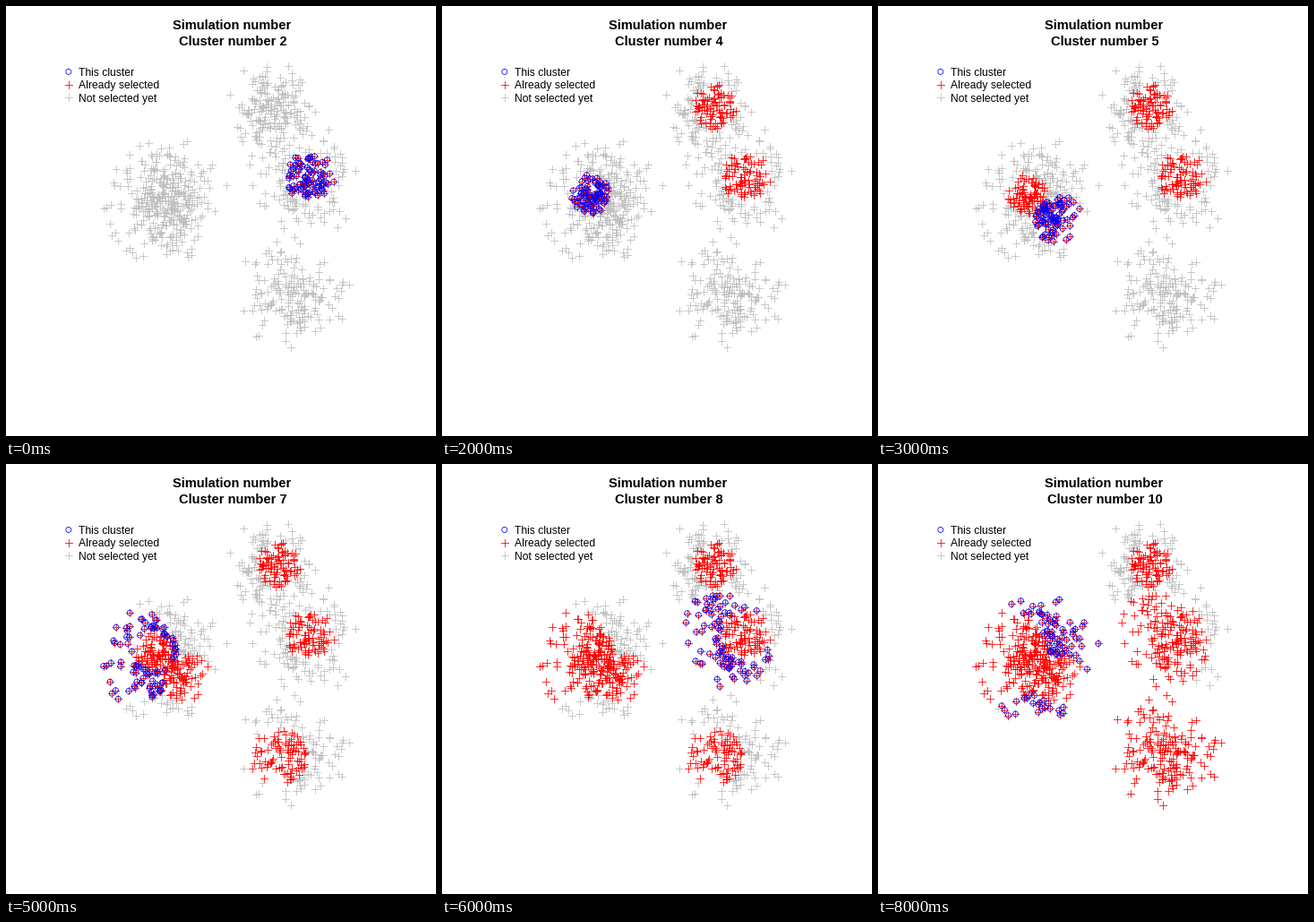
A matplotlib script that plays this animation: 480x480 px, repeating every 9000 ms.

```python
import numpy as np
import matplotlib.pyplot as plt
from matplotlib.animation import FuncAnimation

SIZE, DPI = 480, 80
PX = 72 / DPI  # points per pixel
GRAY, RED, BLUE = "#bebebe", "#ff0000", "#0000ff"
CLUSTER = 90

# count, centre, spread
BLOBS = [
    (361, (178, 217), (26, 27)),
    (195, (296, 118), (22, 20)),
    (195, (336, 196), (25, 23)),
    (181, (319, 321), (24, 25)),
]

# each step takes the free points nearest to its centre
CENTRES = [(339, 192), (304, 112), (165, 210), (204, 241), (302, 327),
           (138, 214), (313, 198), (326, 318), (192, 212)]


def blob(rng, count, centre, spread):
    z = rng.standard_normal((2 * count, 2))
    z = z[np.hypot(*z.T) < 2.8][:count]
    return centre + z * spread


def assign_steps(pts):
    steps = np.full(len(pts), len(CENTRES))
    for k, centre in enumerate(CENTRES):
        dist = np.hypot(*(pts - centre).T)
        dist[steps < k] = np.inf
        steps[np.argsort(dist)[:CLUSTER]] = k
    return steps


rng = np.random.default_rng(12)
points = np.vstack([blob(rng, *b) for b in BLOBS])
steps = assign_steps(points)

fig = plt.figure(figsize=(SIZE / DPI, SIZE / DPI), dpi=DPI, facecolor="white")
ax = fig.add_axes([0, 0, 1, 1])
ax.set(xlim=(0, SIZE), ylim=(SIZE, 0))
ax.axis("off")


def crosses(xy, color):
    x, y = np.transpose(xy)
    return ax.scatter(x, y, s=(9 * PX) ** 2, marker="+", color=color,
                      linewidths=0.78 * PX, snap=False)


def circles(xy):
    x, y = np.transpose(xy)
    return ax.scatter(x, y, s=(6 * PX) ** 2, marker="o", facecolors="none",
                      edgecolors=BLUE, linewidths=0.78 * PX, snap=False)


def label(x, y, text, size, **kw):
    return ax.text(x, y, text, fontsize=size * PX, family="Liberation Sans",
                   color="black", va="baseline", **kw)


free = crosses(points, GRAY)
taken = crosses(points, RED)
current = circles(points)

circles([(69.8, 73.4)])
crosses([(69.8, 87.8)], RED)
crosses([(69.8, 102.2)], GRAY)
for i, text in enumerate(["This cluster", "Already selected",
                          "Not selected yet"]):
    label(81.3, 78 + 14.4 * i, text, 12.1)

label(252, 26, "Simulation number", 14.6, weight="bold", ha="center")
title = label(253.8, 44, "", 14.6, weight="bold", ha="center")


def update(k):
    free.set_offsets(points[steps > k])
    taken.set_offsets(points[steps <= k])
    current.set_offsets(points[steps == k])
    title.set_text(f"Cluster number {k + 2}")
    return free, taken, current, title


anim = FuncAnimation(fig, update, frames=len(CENTRES), interval=1000,
                     repeat=True, repeat_delay=0)
plt.show()
```
